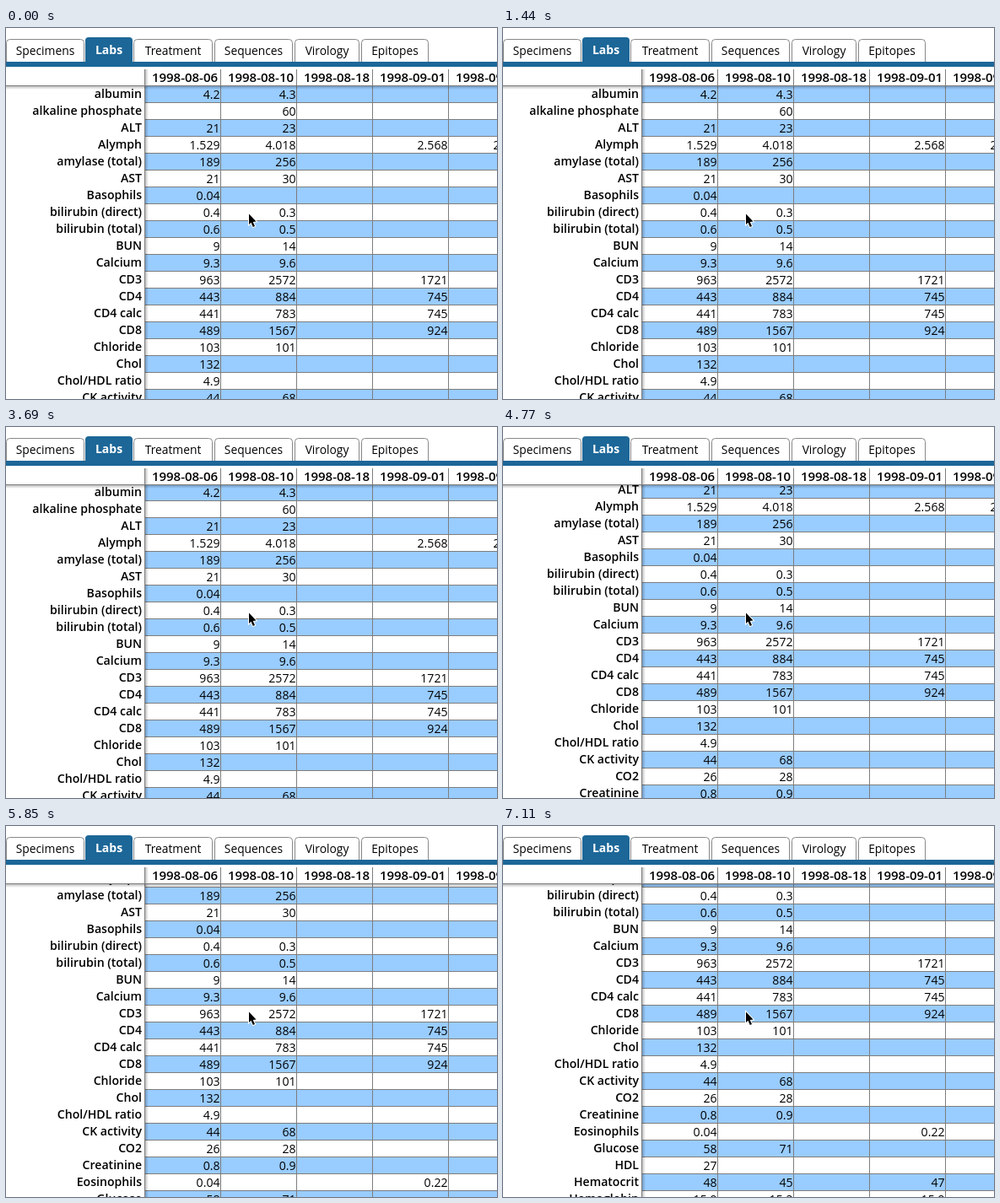
An HTML page with a canvas for the animation above (8000 ms loop, 582 px wide and 440 px high).

```html
<!DOCTYPE html>
<html lang="en">
<head>
<meta charset="utf-8">
<title>Lab results</title>
<style>
  html, body { margin: 0; width: 100%; height: 100%; overflow: hidden; background: #fff; }
  canvas { display: block; }
</style>
</head>
<body>
<canvas id="stage" width="582" height="440"></canvas>
<script>
const ctx = document.getElementById('stage').getContext('2d');
const LOOP = 8000, ROW = 20, TOP = 68, LEFT = 164, COL = 90;
const BLUE = '#9cf', NAVY = '#1c6798', LINE = '#7d7d7d';
const FAMILY = '"Open Sans", "Noto Sans", sans-serif';

// Label followed by one value per date column
const rows = `albumin|4.2|4.3
alkaline phosphate||60
ALT|21|23
Alymph|1.529|4.018||2.568|2.145
amylase (total)|189|256
AST|21|30
Basophils|0.04
bilirubin (direct)|0.4|0.3
bilirubin (total)|0.6|0.5
BUN|9|14
Calcium|9.3|9.6
CD3|963|2572||1721
CD4|443|884||745
CD4 calc|441|783||745
CD8|489|1567||924
Chloride|103|101
Chol|132
Chol/HDL ratio|4.9
CK activity|44|68
CO2|26|28
Creatinine|0.8|0.9
Eosinophils|0.04|||0.22
Glucose|58|71
HDL|27
Hematocrit|48|45||47
Hemoglobin|15.9|15.2||15.9`.split('\n').map(line => line.split('|'));

const dates = ['1998-08-06', '1998-08-10', '1998-08-18', '1998-09-01', '1998-09-08'];
const tabs = [['Specimens', 0, 93], ['Labs', 94, 150], ['Treatment', 151, 245],
  ['Sequences', 247, 340], ['Virology', 342, 419], ['Epitopes', 421, 501]];

// Wheel ticks: [time in ms, scroll offset in px]
const ticks = [[0, 0], [3690, 1], [3780, 16], [4500, 22], [4590, 38], [4770, 44],
  [4860, 56], [5310, 66], [5490, 73], [5850, 76], [5940, 90], [6300, 95],
  [6390, 108], [6660, 112], [6750, 122], [7020, 126], [7110, 136]];

function rect(x, y, w, h, color) {
  ctx.fillStyle = color;
  ctx.fillRect(x, y, w, h);
}

function text(str, x, y, align, weight, size, color = '#000') {
  ctx.font = `${weight} ${size}px ${FAMILY}`;
  ctx.textAlign = align;
  ctx.fillStyle = color;
  ctx.fillText(str, x, y);
}

function shadow(x, y, w, h, dx, dy) {
  const fade = ctx.createLinearGradient(x, y, x + dx, y + dy);
  fade.addColorStop(0, 'rgba(0,0,0,.25)');
  fade.addColorStop(1, 'rgba(0,0,0,0)');
  rect(x, y, w, h, fade);
}

function drawTabs() {
  for (const [name, left, right] of tabs) {
    const mid = (left + right) / 2;
    ctx.beginPath();
    if (name === 'Labs') {
      ctx.roundRect(left, 11, right - left, 32, [4, 4, 0, 0]);
      ctx.fillStyle = NAVY;
      ctx.fill();
      text(name, mid, 31, 'center', 700, 14, '#fff');
    } else {
      ctx.roundRect(left + .5, 13.5, right - left - 1, 27, [4, 4, 0, 0]);
      ctx.strokeStyle = '#888';
      ctx.lineWidth = 1;
      ctx.stroke();
      text(name, mid, 32, 'center', 500, 13.8);
    }
  }
  rect(0, 40, 582, 6, NAVY);
}

function drawRows(scroll) {
  ctx.save();
  ctx.beginPath();
  ctx.rect(0, TOP, 582, 440 - TOP);
  ctx.clip();
  rows.forEach(([label, ...values], i) => {
    const y = TOP + i * ROW - scroll;
    if (i % 2 === 0) rect(LEFT, y + 1, 582 - LEFT, ROW, BLUE);
    rect(LEFT, y + ROW, 582 - LEFT, 1, LINE);
    text(label, 161, y + 15, 'right', 600, 14.1);
    values.forEach((value, c) =>
      text(value, LEFT + COL * (c + 1) - .5, y + 16, 'right', 500, 14.1));
  });
  ctx.restore();
}

function drawHeader() {
  rect(0, 46, 582, TOP - 46, '#fff');
  dates.forEach((date, c) => {
    text(date, LEFT + COL * c + 48, 64, 'center', 600, 15);
    rect(LEFT + COL * (c + 1), 49, 1, 391, LINE);
  });
  rect(LEFT, 49, 1, 391, LINE);
  shadow(LEFT + 1, 49, 4, 391, 4, 0);
  rect(0, TOP, 582, 1, LINE);
  shadow(0, TOP + 1, 582, 4, 0, 4);
}

function drawPointer() {
  ctx.beginPath();
  [[288, 220.5], [288, 233], [290.5, 230.8], [292.8, 236], [295, 235], [292.7, 230], [296.5, 229.5]]
    .forEach(([x, y]) => ctx.lineTo(x, y));
  ctx.closePath();
  ctx.strokeStyle = '#fff';
  ctx.lineWidth = 2;
  ctx.stroke();
  ctx.fillStyle = '#000';
  ctx.fill();
}

function frame() {
  const time = performance.now() % LOOP;
  const scroll = ticks.findLast(([start]) => start <= time)[1];
  rect(0, 0, 582, 440, '#fff');
  drawTabs();
  drawRows(scroll);
  drawHeader();
  drawPointer();
  requestAnimationFrame(frame);
}
frame();
</script>
</body>
</html>
```
